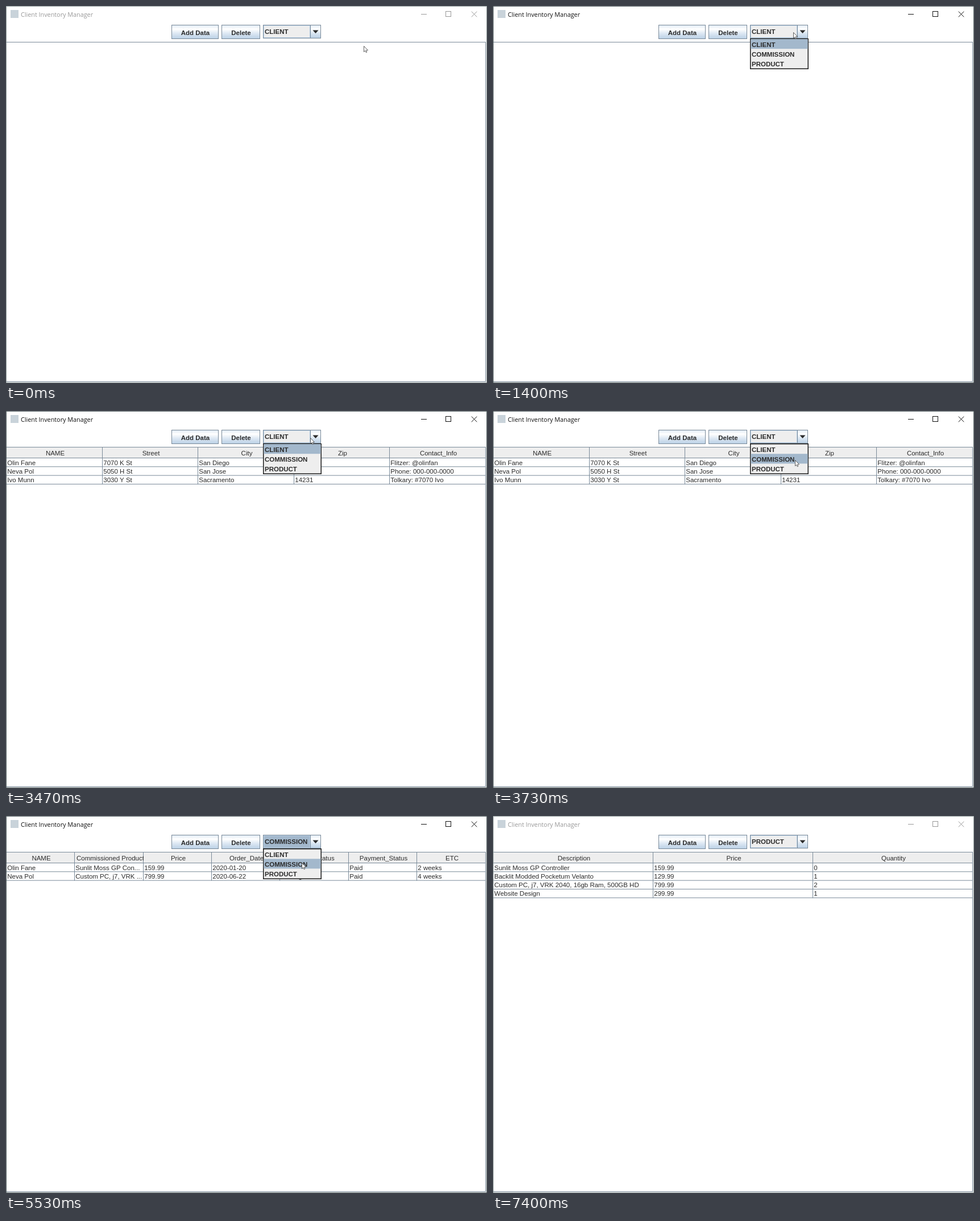
Recreate the animation shown at these times as an HTML page with a canvas. Size 846 by 662 pixels, loop 7590 ms.

```html
<!DOCTYPE html>
<html lang="en">
<head>
<meta charset="utf-8">
<title>Client Inventory Manager</title>
<style>
  html, body { margin: 0; width: 100%; height: 100%; overflow: hidden; background: #fff; }
  canvas { display: block; }
</style>
</head>
<body>
<canvas id="stage" width="846" height="662"></canvas>
<script>
const ctx = document.getElementById('stage').getContext('2d');
const LOOP = 7590, TICK = 1000 / 15;
const SANS = '"Liberation Sans", Arial, sans-serif';
const LINE = '#7a8a99', RING = '#b8cfe5', PANEL = '#eeeeee', PICKED = '#a3b8cc', INK = '#2b2b2b';
const ROW = 15.3, OPTION = 17.2;
const PLAIN = `11.5px ${SANS}`, BOLD = `bold ${PLAIN}`;

const TABLES = [
  {
    name: 'CLIENT',
    head: 'NAME|Street|City|Zip|Contact_Info',
    rows: [
      'Olin Fane|7070 K St|San Diego|12345|Flitzer: @olinfan',
      'Neva Pol|5050 H St|San Jose|54321|Phone: 000-000-0000',
      'Ivo Munn|3030 Y St|Sacramento|14231|Tolkary: #7070 Ivo'
    ]
  },
  {
    name: 'COMMISSION',
    head: 'NAME|Commissioned Product|Price|Order_Date|Order_Status|Payment_Status|ETC',
    rows: [
      'Olin Fane|Sunlit Moss GP Con...|159.99|2020-01-20|Delivered|Paid|2 weeks',
      'Neva Pol|Custom PC, j7, VRK ...|799.99|2020-06-22|In-Progress|Paid|4 weeks'
    ]
  },
  {
    name: 'PRODUCT',
    head: 'Description|Price|Quantity',
    rows: [
      'Sunlit Moss GP Controller|159.99|0',
      'Backlit Modded Pocketum Velanto|129.99|1',
      'Custom PC, j7, VRK 2040, 16gb Ram, 500GB HD|799.99|2',
      'Website Design|299.99|1'
    ]
  }
];

// All times below are in ticks
const FOCUS = 13, BLUR = 111, LEAVE = 99;
const VISITS = [{ open: 21, pick: 38 }, { open: 52, pick: 65 }, { open: 80, pick: 91 }];

// Pointer moves: start, end, x, y
const HOME = { x: 629, y: 70 };
const MOVES = [
  [0, 5, 642, 120], [5, 12, 509, 175], [12, 19, 528, 46], [23, 28, 522, 59], [32, 33, 522, 61],
  [41, 46, 535, 42], [51, 56, 531, 86], [64, 68, 665, 175], [72, 73, 592, 121],
  [73, 78, 538, 49], [81, 84, 514, 94], [90, 91, 506, 121], [91, 98, 520, 582]
];

const ease = u => u * u * (3 - 2 * u);

function box(x, y, w, h, color) {
  ctx.fillStyle = color;
  ctx.fillRect(x, y, w, h);
}

function frame(x, y, w, h, color) {
  ctx.strokeStyle = color;
  ctx.lineWidth = 1;
  ctx.strokeRect(x + .5, y + .5, w - 1, h - 1);
}

function text(str, x, y, font = PLAIN, color = INK, align = 'left') {
  ctx.font = font;
  ctx.fillStyle = color;
  ctx.textAlign = align;
  ctx.fillText(str, x, y);
}

function trace(x, y, ...points) {
  ctx.beginPath();
  ctx.moveTo(x, y);
  points.forEach(p => ctx.lineTo(...p));
}

function glossy(x, y, w, h) {
  const g = ctx.createLinearGradient(0, y, 0, y + h);
  ['#dde8f3', '#ffffff', '#dde8f3', '#b8cfe5'].forEach((c, i) => g.addColorStop(Math.min(1, i * .3 + (i > 2 ? .1 : 0)), c));
  box(x, y, w, h, g);
  frame(x, y, w, h, LINE);
}

function button(label, x, w) {
  glossy(x, 33, w, 25);
  text(label, x + w / 2 + .5, 51, BOLD, INK, 'center');
}

function drawWindow(active) {
  const ink = active ? '#111111' : '#999999';
  box(0, 0, 846, 662, '#ffffff');
  box(8, 7, 14, 14, '#c9d3da');
  text('Client Inventory Manager', 26, 19, '10.8px "Open Sans", "Noto Sans", sans-serif', ink);

  box(730, 14, 10, 1, ink);
  frame(773, 9, 10, 10, ink);
  for (const s of [-4.8, 4.8]) {
    trace(823.5 - s, 9.6, [823.5 + s, 19.2]);
    ctx.stroke();
  }

  frame(0, 63, 844, 597, LINE);
  frame(0, 0, 846, 662, active ? '#566264' : '#8c9898');
}

function drawTable({ head, rows }) {
  const titles = head.split('|');
  const cells = rows.map(r => r.split('|'));
  const edge = i => Math.round(i * 842.6 / titles.length);
  const rowLine = i => 82 + i * ROW;
  const height = rowLine(rows.length) - 63;
  box(1, 64, 842, 18, PANEL);
  for (let i = 0; i <= rows.length; i++) box(1, rowLine(i), 843, 1, LINE);

  titles.forEach((title, c) => {
    const x = edge(c), next = edge(c + 1);
    box(next, 64, 1, height, LINE);
    ctx.save();
    ctx.beginPath();
    ctx.rect(x + 1, 64, next - x, height);
    ctx.clip();
    ctx.font = PLAIN;
    const left = (x + next - ctx.measureText(title).width) / 2 + 2;
    text(title, Math.max(x + 4, left), 78);
    cells.forEach((row, r) => text(row[c], x + 2.3, Math.floor(95 + r * ROW)));
    ctx.restore();
  });
}

function drawCombo(label, focused) {
  box(452, 33, 84, 24, PANEL);
  if (focused) box(454, 35, 81, 20, PICKED);
  frame(452, 33, 84, 24, LINE);
  frame(453, 34, 82, 22, RING);
  glossy(535, 33, 19, 24);
  text(label, 455, 49, BOLD);
  trace(539.5, 42.5, [549.5, 42.5], [544.5, 48]);
  ctx.fill();
}

function drawPopup(hover) {
  box(452, 57, 103, 54, '#1c1c1c');
  box(453.5, 58.5, 100, 51, PANEL);
  box(453.5, 58 + hover * OPTION, 100, OPTION, PICKED);
  TABLES.forEach((t, i) => text(t.name, 455, Math.round(72 + i * OPTION), BOLD));
}

function pointerAt(k) {
  let { x, y } = HOME;
  for (const [start, end, tx, ty] of MOVES) {
    if (k <= start) break;
    const u = ease(Math.min(1, (k - start) / (end - start)));
    x += (tx - x) * u;
    y += (ty - y) * u;
  }
  return { x: Math.round(x), y: Math.round(y) };
}

function drawPointer({ x, y }) {
  ctx.save();
  ctx.translate(x + .5, y + .5);
  trace(0, 0, [0, 10], [2.3, 8], [3.8, 11.2], [5.3, 10.5], [3.9, 7.4], [7, 7.2]);
  ctx.closePath();
  ctx.fillStyle = '#ffffff';
  ctx.strokeStyle = '#3a3a3a';
  ctx.lineWidth = .8;
  ctx.fill();
  ctx.stroke();
  ctx.restore();
}

function draw(ms) {
  const k = Math.floor((ms + 4) / TICK);
  const picks = VISITS.filter(v => k >= v.pick).length;
  const table = TABLES[Math.max(0, picks - 1)];
  const visit = VISITS.findIndex(v => k >= v.open && k < v.pick);
  const pointer = pointerAt(k);

  drawWindow(k >= FOCUS && k < BLUR);
  button('Add Data', 291, 83);
  button('Delete', 379, 68);
  drawCombo(table.name, picks > 0 && k < BLUR && visit !== 1);
  if (picks) drawTable(table);
  if (visit >= 0) {
    const row = Math.floor((pointer.y - 58) / OPTION);
    drawPopup(row < 0 ? TABLES.indexOf(table) : Math.min(row, 2));
  }
  if (k < LEAVE) drawPointer(pointer);
}

const start = performance.now();
function loop(now) {
  draw(Math.max(0, now - start) % LOOP);
  requestAnimationFrame(loop);
}
draw(0);
requestAnimationFrame(loop);
</script>
</body>
</html>
```
